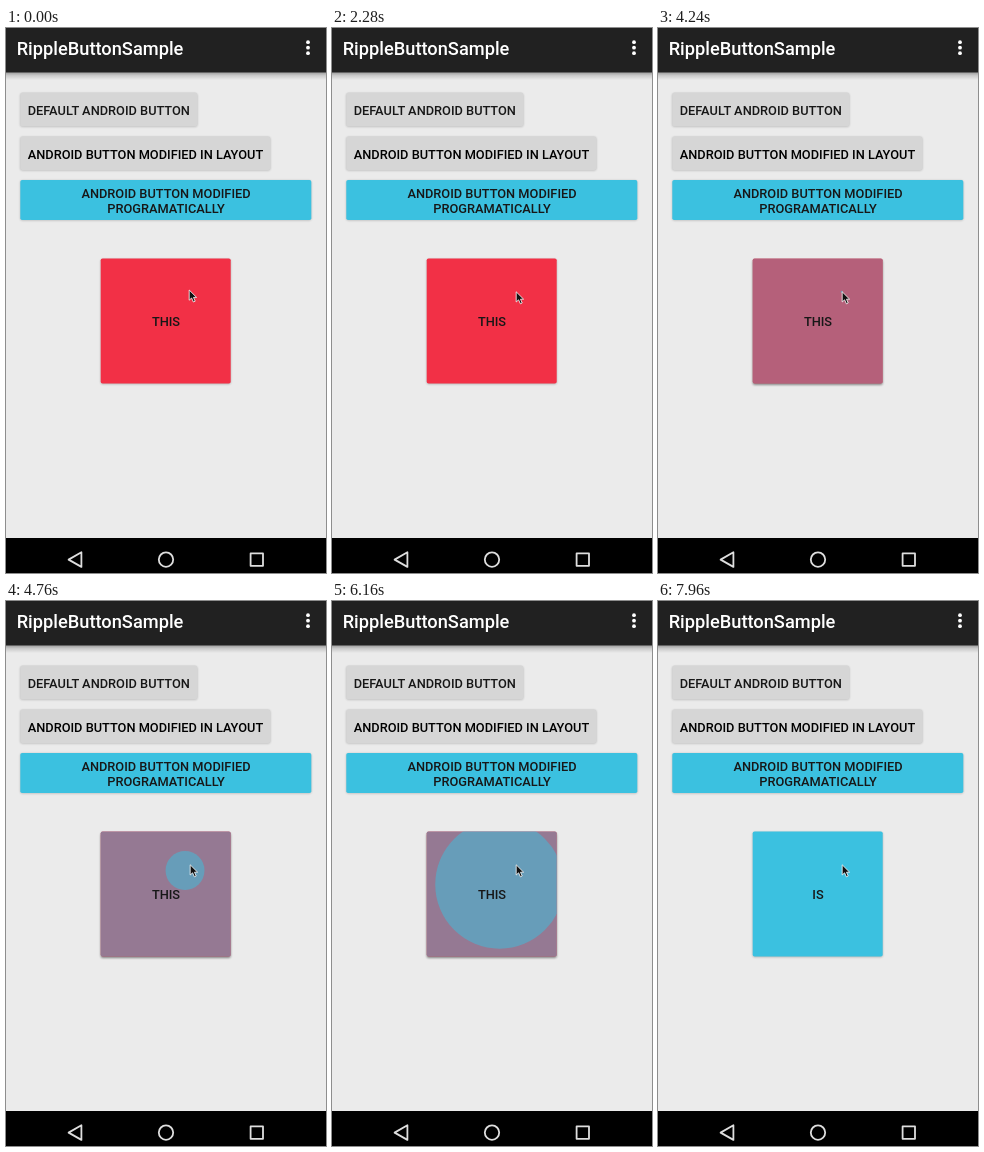
Write an HTML page that moves like this. It is 320x545 px and loops after 8000 ms.

```html
<!DOCTYPE html>
<html lang="en">
<head>
<meta charset="utf-8">
<title>Ripple button</title>
<style>
  html, body { margin: 0; width: 100%; height: 100%; overflow: hidden; background: #ebebeb; }
  svg { display: block; width: 100%; height: 100%; }
  text { font: 500 12.8px Roboto, sans-serif; fill: #171717; }
  .mid { text-anchor: middle; }
  .title { font-size: 18.25px; fill: #fff; }
  .nav { fill: none; stroke: #dedede; stroke-width: 1.8; stroke-linejoin: round; }
</style>
</head>
<body>
<svg viewBox="0 0 320 545" xmlns="http://www.w3.org/2000/svg">
  <defs>
    <linearGradient id="fade" x2="0" y2="1">
      <stop offset="0" stop-color="#000" stop-opacity=".32"/>
      <stop offset=".4" stop-color="#000" stop-opacity=".14"/>
      <stop offset="1" stop-color="#000" stop-opacity="0"/>
    </linearGradient>
    <filter id="blur" x="-10%" y="-10%" width="120%" height="120%">
      <feGaussianBlur stdDeviation="1"/>
    </filter>
    <clipPath id="clip"><rect x="94.7" y="230.5" width="130" height="125" rx="1.8"/></clipPath>
  </defs>

  <rect width="320" height="545" fill="#ebebeb"/>
  <rect y="44.6" width="320" height="7.4" fill="url(#fade)"/>
  <rect width="320" height="44.6" fill="#212121"/>
  <text class="title" x="10.7" y="26.9">RippleButtonSample</text>
  <g fill="#fff">
    <circle cx="302" cy="14.2" r="1.9"/>
    <circle cx="302" cy="19.7" r="1.9"/>
    <circle cx="302" cy="25.2" r="1.9"/>
  </g>

  <g fill="#000" opacity=".22" filter="url(#blur)">
    <rect x="14.3" y="65.4" width="177" height="33.4" rx="2"/>
    <rect x="14.3" y="109.1" width="250" height="33.4" rx="2"/>
    <rect x="14.3" y="152.6" width="291" height="40" rx="2"/>
  </g>
  <rect x="14.3" y="64.6" width="177" height="33.6" rx="1.8" fill="#d6d6d6"/>
  <rect x="14.3" y="108.4" width="250" height="33.6" rx="1.8" fill="#d6d6d6"/>
  <rect x="14.3" y="152" width="291" height="40" rx="1.8" fill="#3bc1e0"/>
  <text x="21.7" y="87">DEFAULT ANDROID BUTTON</text>
  <text x="21.7" y="130.5" style="fill:#000">ANDROID BUTTON MODIFIED IN LAYOUT</text>
  <text class="mid" x="160" y="170.1">ANDROID BUTTON MODIFIED</text>
  <text class="mid" x="160" y="185">PROGRAMATICALLY</text>

  <rect id="shadow" x="94.7" y="231" width="130" height="125" rx="2" filter="url(#blur)"/>
  <g clip-path="url(#clip)">
    <rect id="base" x="94" y="230" width="132" height="126"/>
    <rect id="tint" x="94" y="230" width="132" height="126" fill="#3bc1e0"/>
    <circle id="ripple" fill="#3bc1e0" opacity=".5"/>
  </g>
  <text id="label" class="mid" x="160" y="298.3"></text>

  <rect y="510" width="320" height="35" fill="#000"/>
  <g class="nav">
    <path d="M62.6 531.6L75.4 524.3V538.9Z"/>
    <circle cx="160" cy="531.6" r="7.2"/>
    <rect x="244.6" y="525.4" width="12.4" height="12.4"/>
  </g>
  <path id="cursor" d="M0 0V10.2L2.4 8L4.2 12L6 11.2L4.3 7.4H7.4Z" fill="#111" stroke="#fff" stroke-width=".8"/>
</svg>
<script>
const LOOP = 8000, PRESS = 3560, SWITCH = 7240;
const RED = '#f23046', BLUE = '#3bc1e0';
const touch = [184, 263.4], center = [160, 292.6], maxRadius = 94;
const growth = [[4210, 0], [5320, .417], [6160, .684], [6720, .883], [7050, 1]];

const $ = id => document.getElementById(id);
const set = (id, attrs) => {
  for (const k in attrs) $(id).setAttribute(k, attrs[k]);
};
const ramp = (t, a, b) => Math.min(1, Math.max(0, (t - a) / (b - a)));
const mix = (a, b, p) => a + (b - a) * p;

function track(points, t) {
  let v = points[0][1];
  for (let i = 1; i < points.length; i++) {
    const [t0, v0] = points[i - 1], [t1, v1] = points[i];
    if (t >= t0) v = mix(v0, v1, ramp(t, t0, t1));
  }
  return v;
}

function draw(t) {
  const done = t >= SWITCH;
  const grow = track(growth, t);
  const lift = done ? 1 - ramp(t, SWITCH, SWITCH + 320) : ramp(t, PRESS, PRESS + 800);
  const move = ramp(t, 240, 480);

  set('base', { fill: done ? BLUE : RED });
  set('tint', { opacity: done ? 0 : .5 * ramp(t, PRESS, PRESS + 1020) });
  set('ripple', {
    cx: mix(touch[0], center[0], grow),
    cy: mix(touch[1], center[1], grow),
    r: done ? 0 : maxRadius * grow
  });
  set('shadow', { y: mix(231.3, 232, lift), opacity: mix(.24, .45, lift) });
  set('cursor', { transform: `translate(${mix(183.2, 184.2, move)} ${mix(262, 263.8, move)})` });
  $('label').textContent = done ? 'IS' : 'THIS';
}

const start = performance.now();
function tick() {
  draw((performance.now() - start) % LOOP);
  requestAnimationFrame(tick);
}
draw(0);
requestAnimationFrame(tick);
</script>
</body>
</html>
```
